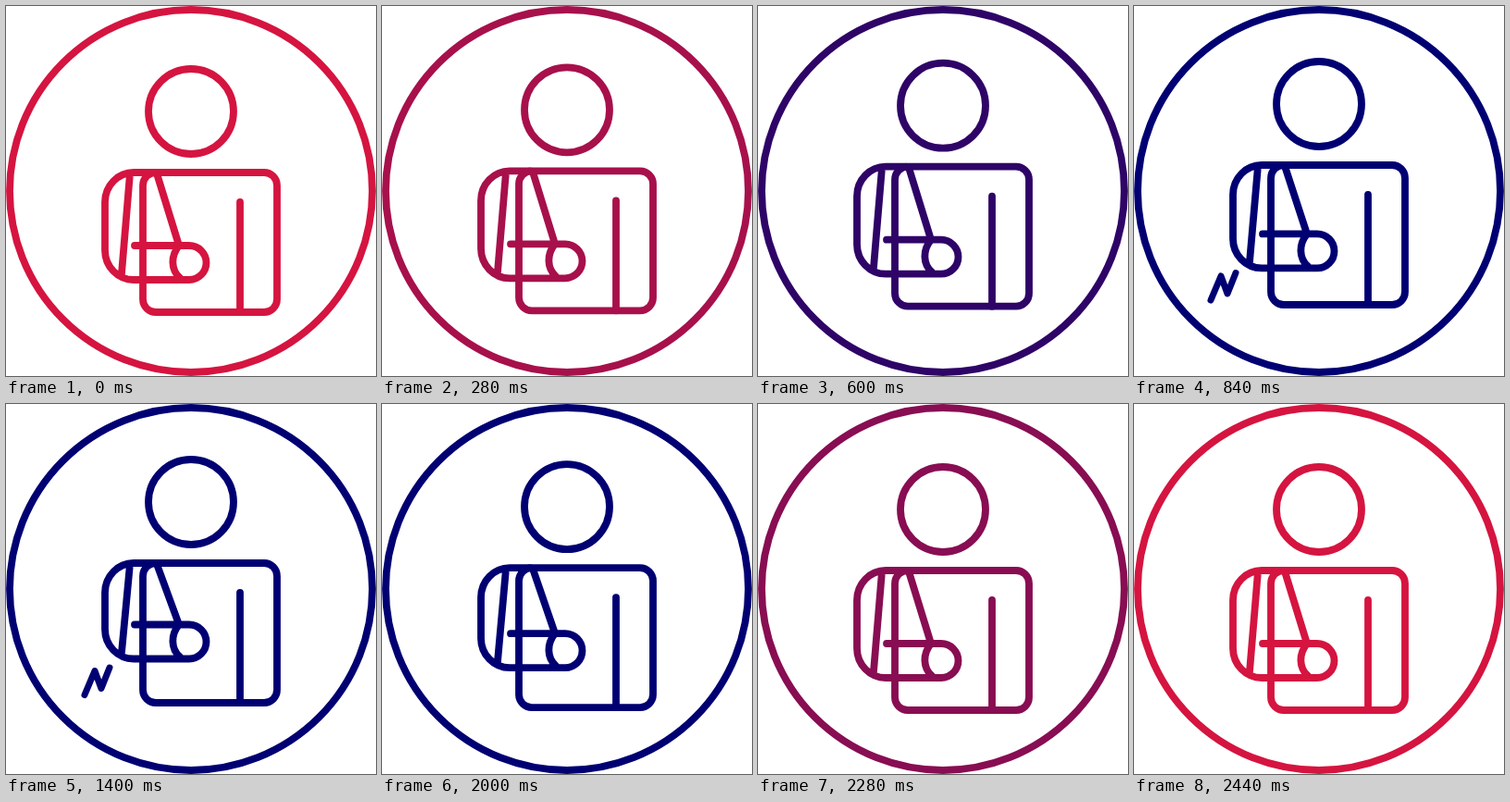
An HTML page for the animation above (2.64 s loop, 400 by 400 pixels).

```html
<!DOCTYPE html>
<html lang="en">
<head>
<meta charset="utf-8">
<title>Arm in a sling</title>
<style>
  html, body { margin: 0; width: 100%; height: 100%; overflow: hidden; background: #fff; }
  svg { display: block; width: 100vw; height: 100vh; }
</style>
</head>
<body>
<svg viewBox="0 0 400 400">
  <g id="icon" fill="none" stroke-width="7.8" stroke-linecap="round" stroke-linejoin="round">
    <circle cx="200" cy="200" r="196"/>
    <g id="body">
      <circle cx="200" cy="114" r="46"/>
      <rect x="148" y="180" width="145" height="151" rx="14"/>
      <path d="M253 212V331"/>
      <path id="arm"/>
    </g>
    <path id="spark" d="M83 318L94 292L101 311L110 288.5" stroke-width="7"/>
  </g>
</svg>
<script>
const STEP = 40, LOOP = 2640;
const RED = [213, 20, 64], NAVY = [0, 0, 114];
const LIFT = 8, BEND = 12.5;
const [icon, body, arm, spark] = ['icon', 'body', 'arm', 'spark'].map(id => document.getElementById(id));

const ramp = (n, from, to) => Math.min(1, Math.max(0, (n - from) / (to - from)));
// Rises over one span of steps and falls back over another
const pulse = (n, a, b, c, d) => ramp(n, a, b) - ramp(n, c, d);

// Only the lower arm rises; shoulder and sling tops stay on the body
function armPath(up) {
  const top = 259 - up, bottom = 296 - up;
  return `M160 180H138A31 32 0 0 0 107 212V${bottom - 32}A31 32 0 0 0 138 ${bottom}H198` +
    `A18.5 18.5 0 0 0 198 ${top}H139` +
    `M134 181L125 ${bottom - 7}` +
    `M163 181L187 ${top}C178 ${top + 11} 178 ${top + 26} 188 ${bottom - 2}`;
}

function draw(t) {
  const n = Math.floor((t % LOOP) / STEP);
  const blue = pulse(n, 4, 18, 50, 61);
  const lift = LIFT * pulse(n, 4, 18, 43, 54);
  const bend = BEND * pulse(n, 17, 28, 46, 57);
  const drift = pulse(n, 21, 32, 32, 43);

  const rgb = RED.map((c, i) => Math.round(c + (NAVY[i] - c) * blue));
  icon.setAttribute('stroke', `rgb(${rgb})`);
  body.setAttribute('transform', `translate(0 ${-lift})`);
  arm.setAttribute('d', armPath(bend));
  spark.setAttribute('transform', `translate(${2.7 * drift} ${-4.8 * drift})`);
  spark.setAttribute('visibility', n >= 18 && n < 44 ? 'visible' : 'hidden');
}

const start = performance.now();
function tick() {
  draw(performance.now() - start);
  requestAnimationFrame(tick);
}
tick();
</script>
</body>
</html>
```
